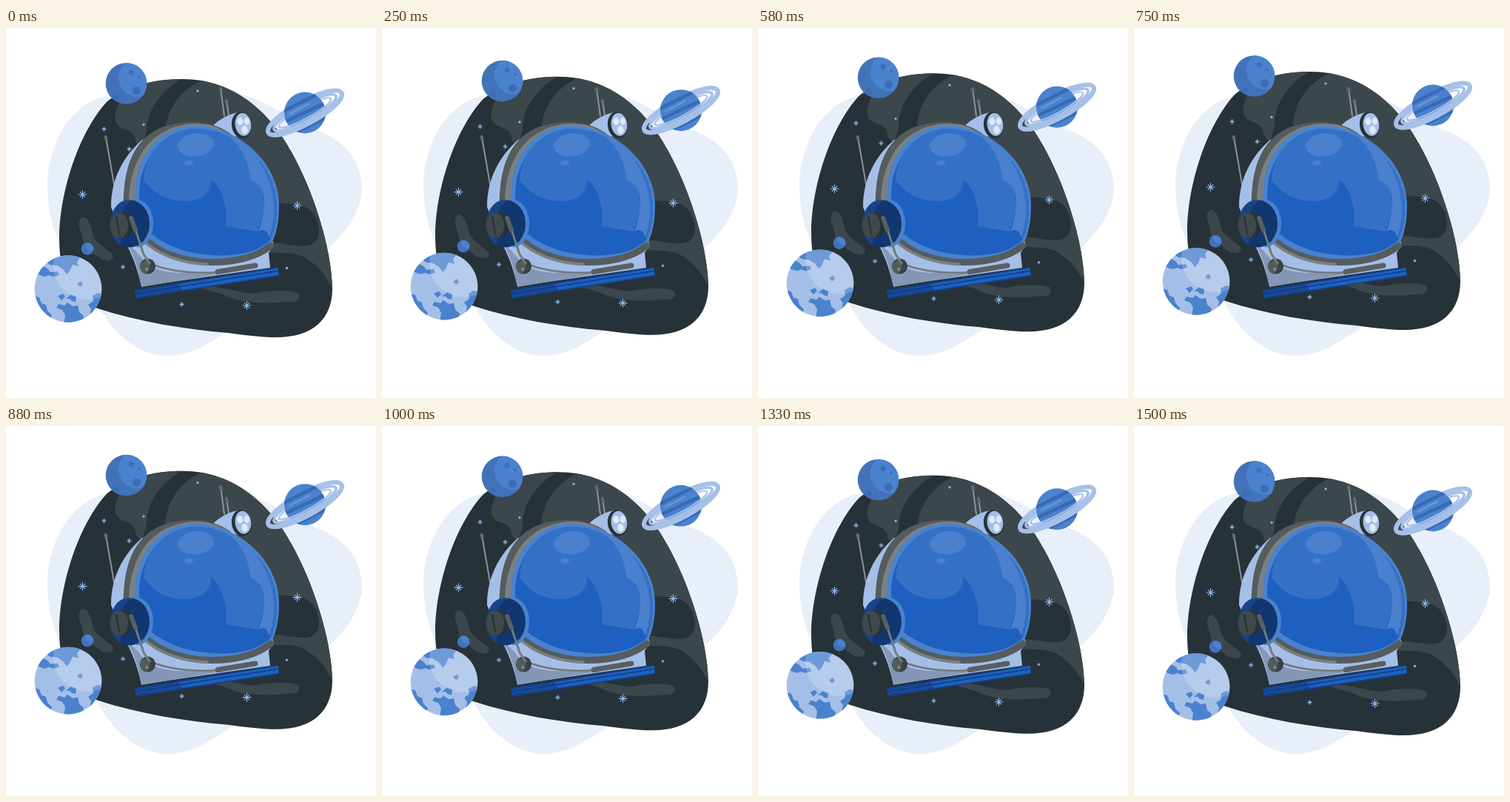
These frames come from a looping animation (500 px wide and 500 px high, 1.54 s). An HTML page:

```html
<!DOCTYPE html>
<html lang="en">
<head>
<meta charset="utf-8">
<title>Space helmet</title>
<style>
  html, body { margin: 0; width: 100%; height: 100%; overflow: hidden; background: #fff; }
  svg { display: block; width: 100vw; height: 100vh; }
  .line { fill: none; stroke-linecap: round; stroke-linejoin: round; }
</style>
</head>
<body>
<svg viewBox="0 0 500 500">
  <defs>
    <path id="sky" d="M238 69C200 69 164 78 137 99C100 138 72 220 72 285C72 335 88 368 124 379C180 397 240 407 300 412C330 416 350 418 365 418C415 418 441 393 441 352C440 295 414 218 386 168C358 116 310 69 238 69Z"/>
    <clipPath id="skyClip"><use href="#sky"/></clipPath>
    <clipPath id="moonClip"><circle cx="162.5" cy="75" r="27.8"/></clipPath>
    <clipPath id="earthClip"><circle cx="84" cy="352.5" r="45.3"/></clipPath>
    <clipPath id="saturnClip"><circle cx="404" cy="114.5" r="28"/></clipPath>
    <clipPath id="frontClip"><rect x="-62" width="124" height="24"/></clipPath>
    <g id="rings" class="line" stroke="#a6c0e8">
      <ellipse rx="56.3" ry="15.3" stroke-width="6"/>
      <ellipse rx="47.5" ry="10.8" stroke-width="3.6"/>
      <ellipse rx="40" ry="7.5" stroke-width="2"/>
    </g>
  </defs>

  <path fill="#e8eff9" d="M135 92C85 103 56 160 56 215C57 270 75 300 95 325C115 355 127 385 146 406C167 429 190 443 220 443C255 441 275 425 300 410C345 380 410 328 437 297C465 270 482 242 481 213C478 170 450 150 420 138C375 118 350 98 322 91C260 80 180 82 135 92Z"/>

  <g id="space">
    <use href="#sky" fill="#263238"/>
    <g fill="#3c474c" clip-path="url(#skyClip)">
      <path d="M237 69L170 60L149 112C145 125 149 132 158 136C170 139 176 146 175 154L184 165L190 140C190 112 208 86 237 69Z"/>
      <path d="M264 71L450 60V352H441C430 330 418 318 402 309C387 302 372 305 350 303V291C375 288 392 298 412 293C428 286 424 262 415 250C404 236 385 239 360 235L215 145C215 112 235 84 264 71Z"/>
      <path d="M103 255C114 257 115 272 119 283C124 293 139 300 144 306C147 313 139 316 131 313C120 309 117 301 110 296C103 294 104 283 102 277C98 270 97 259 103 255Z"/>
      <path d="M262 350C290 347 312 358 336 359C355 354 385 354 394 358C399 366 394 371 380 370C350 373 322 372 302 364C289 357 276 357 262 350Z"/>
    </g>

    <g id="stars" class="line" stroke="#8fbaf4"></g>

    <g clip-path="url(#moonClip)">
      <path fill="#4272b9" d="M134 47h58v58h-58z"/>
      <circle cx="178" cy="67" r="26" fill="#4a82ce"/>
      <g fill="#3c6db4">
        <circle cx="169" cy="60" r="3.5"/><circle cx="176.5" cy="84.5" r="5.5"/>
        <circle cx="150" cy="93" r="4"/><circle cx="180" cy="66" r="1.8"/><circle cx="144" cy="70" r="2"/>
      </g>
    </g>

    <circle cx="110" cy="298.3" r="8.4" fill="#4272b9"/>
    <path fill="#4a82ce" d="M107 291A8.4 8.4 0 0 1 118 301C112 302 107 298 107 291Z"/>

    <g clip-path="url(#earthClip)">
      <path fill="#a4bfe7" d="M38 306h92v92H38z"/>
      <g fill="#4a82ce">
        <path d="M54 316L66 305H104L96 316L98 322L90 320L86 329L82 333L77 326L69 321L60 320Z"/>
        <path d="M42 332L50 322L56 325L60 330L70 329L72 334L64 336L58 334L53 336L46 334Z"/>
        <path d="M38 362L45 364L48 372L54 374L56 382L62 388L58 398H38Z"/>
        <path d="M78 400L80 388L76 381L68 378L71 373L79 375L83 371L90 376L97 375L99 384L105 389L103 400Z"/>
        <path d="M81 366L88 360L95 363L94 370L89 369L86 366Z"/>
        <path d="M96 346L101 342L104 347L100 350Z"/>
        <path d="M70 362L77 359L80 363L75 368Z"/>
        <path d="M113 388L115 380L111 374L118 369L117 362L124 358L132 360V390Z"/>
      </g>
      <circle cx="110" cy="321" r="46" fill="#fff" opacity=".2"/>
    </g>

    <g transform="translate(404 114.5) rotate(-28.5)"><use href="#rings"/></g>
    <g clip-path="url(#saturnClip)">
      <path fill="#4a82ce" d="M375 86h58v58h-58z"/>
      <path class="line" stroke="#3769b4" stroke-width="4.500" d="M374 113L424 88M376 127L434 100M388 143L436 119"/>
      <path class="line" stroke="#6d9ada" stroke-width="2" d="M383 116L410 102"/>
    </g>
    <g transform="translate(404 114.5) rotate(-28.5)" clip-path="url(#frontClip)"><use href="#rings"/></g>
  </g>

  <g id="helmet">
    <g class="line" stroke="#8c9395" stroke-width="2">
      <path d="M290 82L295 119M298 98L301 118M135 148L151 240M151 214L156 238"/>
      <path stroke="#656d70" stroke-width="4" d="M290 82L290.5 86M298 98L298.5 102M134.7 147L135.5 151M150.5 214L152 221"/>
    </g>

    <path fill="#a4bfe7" d="M276 137C283 127 297 117 314 114L320 147L300 146Z"/>
    <g transform="rotate(-8 319 131)">
      <ellipse cx="318.5" cy="131" rx="13.5" ry="18" fill="#263238"/>
      <ellipse cx="320.5" cy="130.5" rx="10.8" ry="15.5" fill="#a4bfe7"/>
      <g fill="#dfe9f8">
        <ellipse cx="317" cy="126" rx="4" ry="5"/><ellipse cx="326" cy="127" rx="3.6" ry="5"/>
        <ellipse cx="321.5" cy="138" rx="4.2" ry="5.5"/>
      </g>
    </g>

    <path fill="#a4bfe7" d="M142 242C142 204 158 174 184 151L330 200L362 293L355 304L357 324L183 349C178 325 168 300 160 288Z"/>
    <path fill="#8497b6" d="M165 293C182 304 184 318 204 326C228 334 255 330 290 332L183 350C179 325 172 306 165 293Z"/>
    <path class="line" stroke="#737a7c" stroke-width="2.5" d="M194 318C225 331 258 332 288 330"/>
    <path class="line" stroke="#596063" stroke-width="7" d="M286 329.5L337 321"/>

    <path fill="#555c5e" d="M304 143C286 130 265 126 245 127.5C185 130 157 170 159 245L182 285L260 230Z"/>
    <path fill="#7b8182" d="M302 143C285 132 268 128 250 129.5C198 134 165 174 166 242L187 283L260 230Z"/>

    <path fill="#4a82ce" d="M255 132C312 132 369 180 369 241C369 262 365 280 359 290C345 306 320 314 290 314C250 314 213 304 188 282C178 267 174 245 174 222C176 170 210 132 255 132Z"/>
    <path fill="#1d60c0" d="M258 136C312 137 366 185 366 242C366 264 362 278 357 287C342 301 318 307.5 290 307.5C252 307 220 297 196 278C184 264 180 245 180 222C182 173 215 136 258 136Z"/>
    <path fill="#3471c6" d="M186 204C189 165 219 136 258 136C312 137 366 185 366 242C366 264 362 278 357 287C363 250 354 222 346 211L349 240C347 255 343 265 340 275L297 268C301 240 290 215 277 204C279 224 262 234 240 234C215 234 195 220 186 204Z"/>
    <path fill="#4a80ce" d="M297 145C319 157 328 182 331 206C345 209 350 225 349 240C347 255 345 265 341 275C349 270 354 275 356 284C359 272 362 260 362 243C361 205 340 160 297 145Z"/>
    <ellipse cx="256.5" cy="158" rx="24.5" ry="15.5" fill="#4a80ce" transform="rotate(-7 256 158)"/>
    <ellipse cx="247" cy="182" rx="6" ry="3.5" fill="#4a80ce"/>

    <path class="line" stroke="#555c5e" stroke-width="9" d="M186 284C205 302 235 316 275 316.5C310 317 340 309 358 294"/>
    <path class="line" stroke="#7b8182" stroke-width="3.5" d="M184 286C203 304 233 318 272 319"/>

    <path fill="#4a82ce" d="M168 234C184 226 198 242 199 262C199 282 190 297 176 296Z"/>
    <ellipse cx="167.5" cy="264.5" rx="26.5" ry="32" fill="#12366f"/>
    <path fill="#174489" d="M143 252C149 235 160 231 170 233C157 240 151 260 156 294C144 288 138 270 143 252Z"/>
    <ellipse cx="158" cy="266" rx="15" ry="17.5" fill="#263238"/>
    <ellipse cx="153" cy="266.5" rx="12.5" ry="17" fill="#3f484b"/>
    <path class="line" stroke="#263238" stroke-width="2" d="M149 255L153 278M163 253C168 262 167 273 162 280"/>

    <circle cx="191.5" cy="322" r="10.5" fill="#394144"/>
    <ellipse cx="188" cy="323" rx="6.5" ry="9" fill="#525a5c"/>
    <g class="line" stroke="#737a7c">
      <path stroke-width="3" d="M175 273L186 306L194 318"/>
      <path stroke="#596063" stroke-width="6" d="M169 257L175 273"/>
    </g>
    <circle cx="190" cy="326" r="2" fill="#858c8e"/>

    <path fill="#1d60c0" d="M174 354L367.5 323L369 335L176 365.5Z"/>
    <path fill="#154a98" d="M174 354L233 344.5L238 355.7L176 365.5Z"/>
    <path class="line" stroke="#123c7e" stroke-width="1.4" d="M175 354.5L367.5 323.7M175 359L368 328.2M176 364.8L368.5 334.4"/>
  </g>
</svg>
<script>
  const LOOP = 1540, PERIOD = 1500, LIFT = 10, FPS = 24;

  // x, y, radius
  const stars = [
    [103.5, 225, 5.5], [393.5, 240, 5.5], [325.5, 375, 5.5],
    [132.5, 136.5, 3], [166.5, 163.5, 3], [158, 323, 3], [237.5, 373.5, 3],
    [186, 130.5, 1.5], [259, 85, 1.5], [379.5, 324.5, 1.5]
  ];
  document.getElementById('stars').innerHTML = stars.map(([x, y, r]) => {
    const d = r * 0.6;
    return `<path stroke-width="${r > 4 ? 1.1 : 0.9}" d="M${x - r} ${y}h${2 * r}M${x} ${y - r}v${2 * r}` +
      `M${x - d} ${y - d}l${2 * d} ${2 * d}M${x - d} ${y + d}l${2 * d} ${-2 * d}"/>`;
  }).join('');

  const space = document.getElementById('space');

  function draw(now) {
    // Linear float up and down, stepped at 24 frames per second
    const step = Math.floor((now % LOOP + 5) * FPS / 1000);
    const phase = step * 1000 / FPS / PERIOD;
    const y = -LIFT * (1 - Math.abs(1 - 2 * phase));
    space.setAttribute('transform', `translate(0 ${y.toFixed(3)})`);
    requestAnimationFrame(draw);
  }
  draw(performance.now());
</script>
</body>
</html>
```
